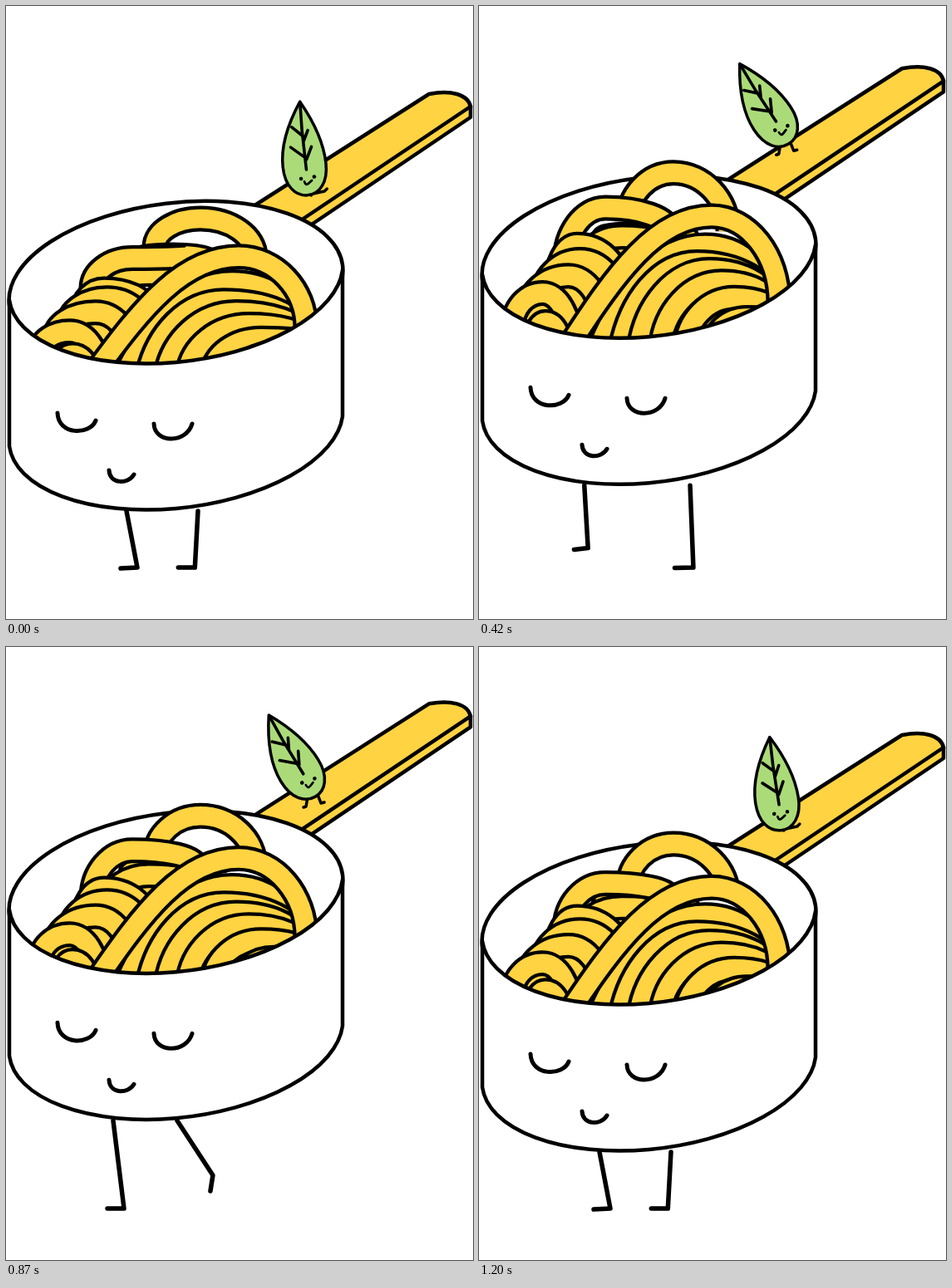
Recreate the animation shown at these times as an HTML page with a canvas. Size 562 px wide and 738 px high, loop 1.23 s.

```html
<!DOCTYPE html>
<html lang="en">
<head>
<meta charset="utf-8">
<title>Walking noodle pot</title>
<style>
html, body { margin: 0; width: 100%; height: 100%; overflow: hidden; background: #fff; }
canvas { display: block; }
</style>
</head>
<body>
<canvas id="stage" width="562" height="738"></canvas>
<script>
const ctx = document.getElementById('stage').getContext('2d');
const LOOP = 1230, STEP = 30, STRIDE = 1200, BOUNCE = 615;
const YELLOW = '#ffd341', GREEN = '#abdb78';

// Keys: [time, values...]
const leftHip = [[0, 145], [300, 133], [540, 123], [870, 129]];
const rightHip = [[0, 231], [540, 256], [870, 206]];
// ankle x, ankle y, toe x, toe y; both feet share one stride, half a turn apart
const footKeys = [[0, 158, 676, 138, 677], [60, 158, 662, 144, 671], [270, 144, 636, 141, 655],
  [300, 140, 643, 124, 659], [390, 133, 648, 117, 652], [540, 126, 676, 106, 676], [870, 142, 676, 122, 676]];
// centre y, tilt in degrees
const leafKeys = [[0, 195, -4], [45, 187, -3], [255, 152, -29], [375, 136, -34], [540, 160, -11], [585, 188, -6.5]];
// lift of the back, left and front noodles, 0 to 1
const liftKeys = [[0, .46, .15, .24], [45, 0, 0, 0], [255, .76, .74, .56],
  [375, .92, .96, .76], [540, 1, 1, 1], [585, .84, .68, .66]];

const handle = new Path2D('M290 246L509 106C535 101 556 106 559 121V134L350 275Z');
const handleEdge = new Path2D('M559 121L340 268');
const body = new Path2D('M4 354A202 99 -6.74 0 0 405 318V494A202 99 -6.74 0 1 4 530Z');
const leaf = new Path2D('M0-80C-14-58-27-30-26-3C-25 21-13 33 1 33C16 33 27 19 26-4C25-30 13-58 0-80Z');
const veins = new Path2D('M0-78L0-45L2 2M-12-50L1-38M7-45L1-32M-15-26L2-12M10-25L3-10');

// Periodic smooth interpolation that never overshoots its keys
function sample(keys, period, time) {
  const n = keys.length;
  const keyAt = i => {
    const turn = Math.floor(i / n), [at, ...values] = keys[i - turn * n];
    return [at + turn * period, ...values];
  };
  let i = n - 1;
  while (keys[i][0] > time) i--;
  const [p, a, b, c] = [-1, 0, 1, 2].map(d => keyAt(i + d));
  const h = b[0] - a[0], u = (time - a[0]) / h;
  return a.slice(1).map((from, k) => {
    const j = k + 1, to = b[j];
    const slope = (m, q) => (q[j] - m[j]) / (q[0] - m[0]);
    const tangent = (s, r) => s * r > 0 ? 2 * s * r / (s + r) * h : 0;
    const middle = slope(a, b);
    const t0 = tangent(slope(p, a), middle), t1 = tangent(middle, slope(b, c));
    const e = u * u * (3 - 2 * u);
    return from + (to - from) * e + t0 * u * (1 - u) ** 2 - t1 * u * u * (1 - u);
  });
}

const mix = (a, b, u) => a + (b - a) * u;

function stroke(path, width, color = '#000') {
  ctx.lineWidth = width;
  ctx.strokeStyle = color;
  ctx.stroke(path);
}

function shape(path, fill, width) {
  ctx.fillStyle = fill;
  ctx.fill(path);
  stroke(path, width);
}

function polyline(points, width) {
  const path = new Path2D();
  points.forEach(([x, y]) => path.lineTo(x, y));
  stroke(path, width);
}

// Bowl-shaped line, used for closed eyes and mouths
function smile(x0, y0, x1, y1, depth, width) {
  const path = new Path2D();
  path.moveTo(x0, y0);
  path.bezierCurveTo(x0 + 1, y0 + depth, x1 - 7, y0 + depth, x1, y1);
  stroke(path, width);
}

function potOffset(time) {
  const u = 1 - Math.abs(time % 600 / 300 - 1);
  const v = u + u * (1 - u) / 2;
  return -38 * v * v * (3 - 2 * v);
}

function drawLegs(time, dy) {
  const leg = (hipKeys, shift, place) => {
    const [hip] = sample(hipKeys, STRIDE, time);
    const [x, y, toeX, toeY] = sample(footKeys, STRIDE, (time + shift) % STRIDE);
    const ankle = place(x);
    polyline([[hip, 608 + dy], [ankle, y], [ankle + toeX - x, toeY]], 5.5);
  };
  leg(leftHip, 0, x => x);
  leg(rightHip, 600, x => 228 + (x - 127.5) * 1.27);
}

// One arch from a left foot over a peak, whose top moves from low to high, to a right foot
function noodle(lift, x0, y0, px, high, low, x1, y1, lean = 0, filled = false) {
  const py = mix(low, high, lift) + 15, k = .55;
  const path = new Path2D();
  path.moveTo(x0, y0);
  path.bezierCurveTo(mix(x0, px, lean), mix(y0, py, k), mix(px, x0, k - lean / 2), py, px, py);
  path.bezierCurveTo(mix(px, x1, k), py, x1, mix(y1, py, k), x1, y1);
  if (filled) {
    ctx.fillStyle = YELLOW;
    ctx.fill(path);
  }
  stroke(path, 31);
  stroke(path, 22.5, YELLOW);
}

function drawNoodles(back, left, front) {
  noodle(back, 179, 290, 234, 214, 264, 300, 302);
  noodle(left, 150, 310, 200, 290, 284, 250, 310);
  noodle(left, 125, 345, 172, 293, 310, 232, 325, 0, true);
  noodle(left, 103, 340, 152, 258, 294, 228, 300);
  for (let i = 0; i < 4; i++) {
    noodle(front, 92 - 17 * i, 368 + 16 * i, 118 + 12 * i - 8.6 * i * i, 297 + 20 * i,
      335 + 4 * i + 4 * i * i, 168 + 8 * i - 9 * i * i, 365 + 24 * i, 0, true);
  }
  noodle(front, 68, 432, 80, 394, 408, 98, 440, 0, true);
  noodle(front, 145, 440, 272, 300, 323, 345, 380, .22, true);
  for (let i = 0; i < 5; i++) {
    noodle(front, 170 + 20 * i + 2 * i * i, 442, 262 + 15 * i, 320 + 5 * i + 3 * i * i,
      346 + 15.5 * i, 352 + 3 * i, 392 + 4.5 * i, .12 - .03 * i, true);
  }
  noodle(front, 110, 437, 280, 264, 294, 361, 388, .32);
}

function drawLeaf(phase) {
  const [y, tilt] = sample(leafKeys, BOUNCE, phase);
  const stand = Math.min(1, Math.max(0, (-tilt - 11) / 15));
  const leg = (sitting, standing) =>
    polyline(sitting.map((p, i) => p.map((v, j) => mix(v, standing[i][j], stand))), 3.5);
  ctx.save();
  ctx.translate(360 + tilt * .17, y);
  leg([[2, 28], [6, 32], [8, 33]], [[8, 28], [6, 40], [3, 41]]);
  leg([[10, 31], [24, 28], [27, 25]], [[20, 26], [24, 36], [28, 35]]);
  ctx.rotate(tilt * Math.PI / 180);
  shape(leaf, GREEN, 3.5);
  stroke(veins, 3.6);
  ctx.translate(3, 14);
  ctx.rotate((-7 - tilt * .6) * Math.PI / 180);
  ctx.fillStyle = '#000';
  for (const x of [-8, 8]) {
    ctx.beginPath();
    ctx.arc(x, -2, 2.3, 0, 7);
    ctx.fill();
  }
  smile(-4.5, 2, 4.5, 2, 5, 2.8);
  ctx.restore();
}

function draw(time) {
  const phase = time % BOUNCE, dy = potOffset(time);
  ctx.fillStyle = '#fff';
  ctx.fillRect(0, 0, 562, 738);
  ctx.lineCap = ctx.lineJoin = 'round';
  drawLegs(time % STRIDE, dy);

  ctx.save();
  ctx.translate(0, dy);
  shape(handle, YELLOW, 4.5);
  stroke(handleEdge, 4.5);
  const rim = new Path2D();
  rim.ellipse(204.5, 336, 202, 99, -.1176, 0, 2 * Math.PI);
  shape(rim, '#fff', 4.5);
  ctx.lineCap = 'butt';
  drawNoodles(...sample(liftKeys, BOUNCE, phase));
  ctx.lineCap = 'round';
  shape(body, '#fff', 4.5);
  smile(62, 490, 108, 499, 27, 5);
  smile(178, 503, 224, 503, 24, 5);
  smile(124, 559, 154, 564, 17, 5);
  ctx.restore();
  drawLeaf(phase);
}

function tick() {
  draw(Math.floor(performance.now() % LOOP / STEP) * STEP);
  requestAnimationFrame(tick);
}
tick();
</script>
</body>
</html>
```
